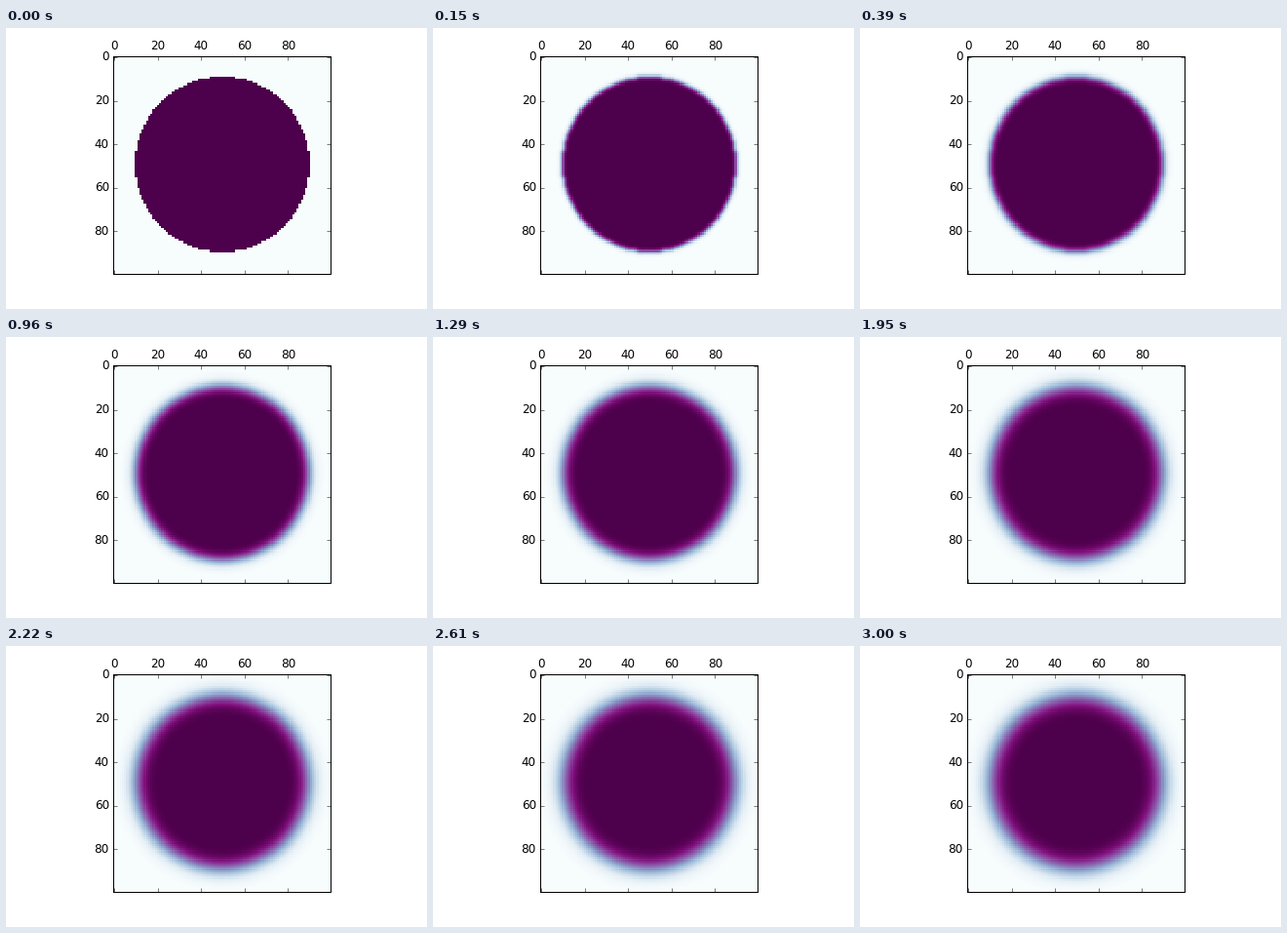
A matplotlib script that plays this animation: 432 by 288 pixels, repeating every 3.03 s.

```python
import matplotlib.pyplot as plt
import numpy as np
from matplotlib.animation import FuncAnimation

W, H, DPI = 432, 288, 72
N, RADIUS = 100, 40
RATE = 0.1  # D * dt / dx**2
FRAMES, INTERVAL = 101, 30

plt.style.use("classic")
plt.rcParams.update({"figure.dpi": DPI, "savefig.dpi": DPI,
                     "figure.facecolor": "white", "font.family": "DejaVu Sans"})


def disk():
    y, x = np.mgrid[:N, :N] - (N - 1) / 2
    return (x**2 + y**2 <= RADIUS**2).astype(float)


def diffuse(u):
    """One explicit heat step with the border held fixed."""
    new = u.copy()
    new[1:-1, 1:-1] += RATE * (u[2:, 1:-1] + u[:-2, 1:-1] + u[1:-1, 2:]
                               + u[1:-1, :-2] - 4 * u[1:-1, 1:-1])
    return new


states = [disk()]
while len(states) < FRAMES:
    states.append(diffuse(states[-1]))

# Axes box in pixels, measured from the top left
LEFT, TOP, SIZE = 109.8, 28.8, 223.2


def to_data(px, start):
    return (px - start) / SIZE * N - 0.5


fig = plt.figure(figsize=(W / DPI, H / DPI), dpi=DPI)
ax = fig.add_axes([LEFT / W, 1 - (TOP + SIZE) / H, SIZE / W, SIZE / H])

# Snap the image to whole pixels
extent = (to_data(110, LEFT), to_data(334, LEFT),
          to_data(252, TOP), to_data(28, TOP))
image = ax.imshow(states[0], cmap="BuPu", vmin=0, vmax=1, extent=extent,
                  origin="upper", interpolation="nearest", aspect="auto")
ax.set_xlim(-0.5, N - 0.5)
ax.set_ylim(N - 0.5, -0.5)
ax.set_xticks(range(0, N, 20))
ax.set_yticks(range(0, N, 20))
ax.xaxis.tick_top()
ax.xaxis.set_ticks_position("both")
ax.tick_params(axis="x", labeltop=True, labelbottom=False)


def update(i):
    image.set_data(states[i])
    return [image]


anim = FuncAnimation(fig, update, frames=FRAMES, interval=INTERVAL,
                     repeat=True, repeat_delay=0, blit=False)
plt.show()
```
